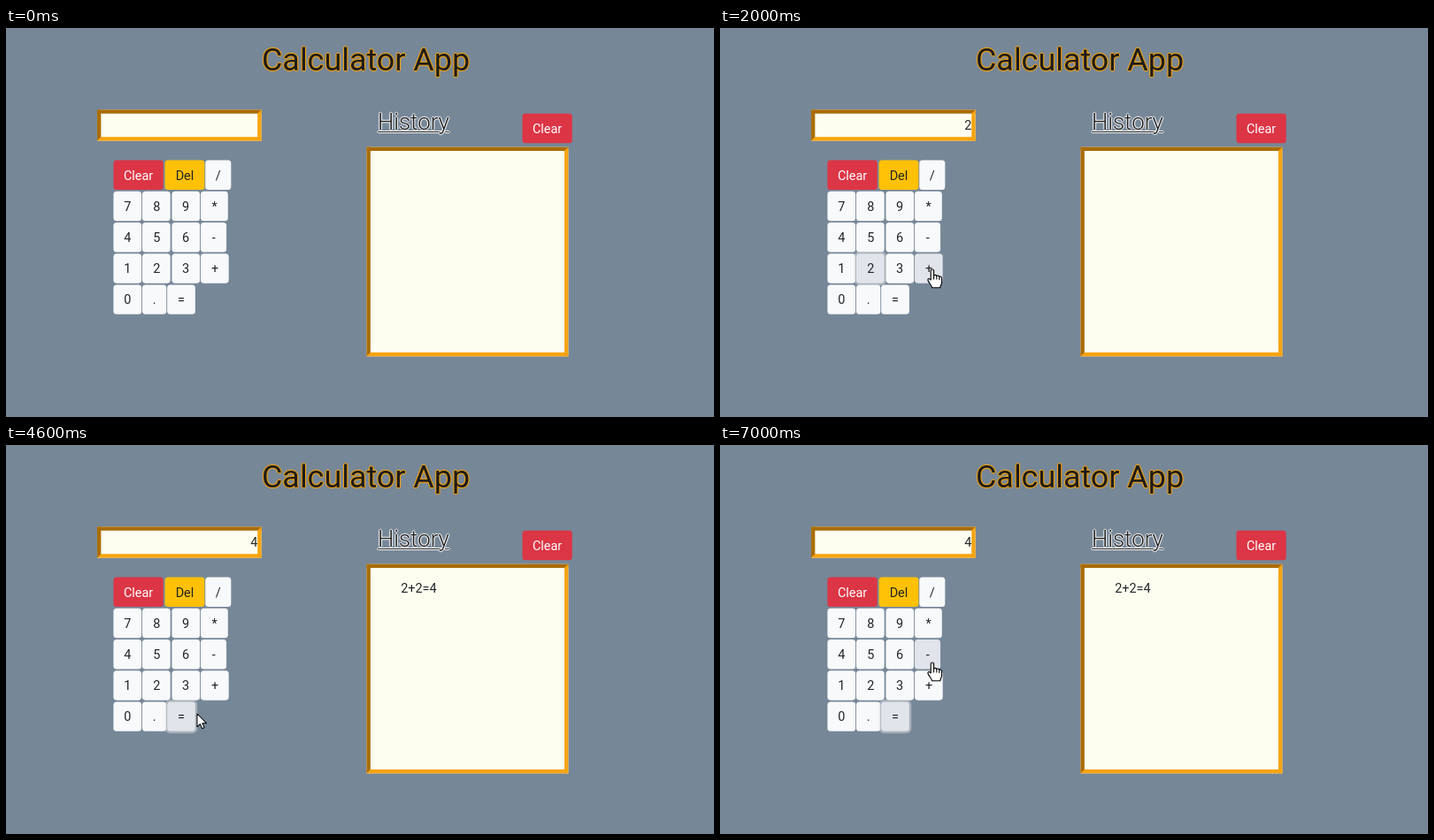
Recreate the animation shown at these times as an HTML page. Size 800 px wide and 440 px high, loop 7.1 s.

```html
<!DOCTYPE html>
<html lang="en">
<head>
<meta charset="utf-8">
<title>Calculator App</title>
<style>
  html, body { margin: 0; width: 100%; height: 100%; overflow: hidden; background: #768798; }
  #stage {
    position: relative; width: 800px; height: 440px; overflow: hidden;
    background: #768798; color: #212529; font: 16.4px Roboto, sans-serif;
  }
  #page { left: 0; top: 0; width: 909px; height: 500px; transform: scale(.88); transform-origin: 0 0; }
  #stage > *, #page > * { position: absolute; box-sizing: border-box; white-space: pre; }
  h1, h2 { margin: 0; color: #1c1c1c; }
  h1 {
    left: 289px; top: 16px; line-height: 40px; font-size: 35.9px; font-weight: 400;
    text-shadow: 1px 0 1px orange, -1px 0 1px orange, 0 1px 1px orange, 0 -1px 1px orange;
  }
  h2 {
    left: 420px; top: 91px; line-height: 30px; font-size: 25.8px; font-weight: 300;
    text-decoration: underline 1px; text-underline-offset: 2px;
    text-shadow: 1px 0 1px #fff, -1px 0 1px #fff, 0 1px 1px #fff, 0 -1px 1px #fff;
  }
  .field {
    background: #fefef0; border: 5px solid;
    border-color: #a96d08 #f6a410 #f6a410 #a96d08;
  }
  #display { left: 117px; top: 105px; width: 211px; height: 40px; line-height: 32px; text-align: right; }
  #log { left: 463px; top: 153px; width: 259px; height: 269px; padding: 16px 0 0 39px; line-height: 22px; }
  .key {
    display: flex; align-items: center; justify-content: center;
    height: 38px; border-radius: 4px; background: #f8f9fa;
  }
  .red { background: #dc3545; color: #fff; }
  .yellow { background: #ffc107; }
  #cursor { left: 0; top: 0; width: 30px; height: 30px; overflow: visible; }
  #cursor path { fill: #fff; stroke: #000; stroke-width: 1.1; stroke-linejoin: round; stroke-linecap: round; }
</style>
</head>
<body>
<div id="stage">
  <h1>Calculator App</h1>
  <h2>History</h2>
  <div id="page">
    <div id="display" class="field"></div>
    <div id="log" class="field"></div>
  </div>
  <svg id="cursor">
    <path id="arrow" transform="scale(.92)" d="M0 0V16L3.7 12.6 6.2 18.2 8.8 17 6.4 11.6H11.3Z"/>
    <g id="hand">
      <path d="M-1.8 1.5C-1.8-.6 1.6-.6 1.6 1.5V7.2C2.2 5.9 4.6 6.2 4.8 7.6
        5.6 6.6 7.6 7 7.8 8.5 8.8 7.6 10.6 8.2 10.6 10V14.5C10.6 17 9 18 8.8 20.8
        H-.4C-.6 18.6-2.6 16.8-4.6 13.4-6.2 10.8-3.6 9.6-1.8 12Z"/>
      <path d="M1.6 7V11M4.8 7.8V11M7.8 8.6V11.4"/>
    </g>
  </svg>
</div>
<script>
const LOOP = 7100, STEP = 100, FADE = 150, ZOOM = .88;
const [page, display, log, cursor, arrow, hand] =
  ['page', 'display', 'log', 'cursor', 'arrow', 'hand'].map(id => document.getElementById(id));

const keys = [];
function addKey(label, x, w, y, cls = '') {
  const el = document.createElement('div');
  el.className = 'key ' + cls;
  el.textContent = label;
  el.style.cssText = `left:${x}px;top:${y}px;width:${w}px`;
  page.append(el);
  keys.push({ label, x, y, w, h: 38, el, plain: !cls });
}
const rowY = i => 170 + 40 * i;
addKey('Clear', 663, 64, 110, 'red');
addKey('Clear', 138, 64, rowY(0), 'red');
addKey('Del', 204, 51, rowY(0), 'yellow');
addKey('/', 256, 33, rowY(0));
['789*', '456-', '123+'].forEach((row, i) => {
  const lastWidth = [35, 33, 36][i];
  [...row].forEach((c, j) =>
    addKey(c, 138 + 37.4 * j, j < 3 ? 36 : lastWidth, rowY(i + 1)));
});
addKey('0', 138, 36, rowY(4));
addKey('.', 175, 31, rowY(4));
addKey('=', 207, 36, rowY(4));

// time, x, y of the pointer tip
const path = [
  [100, 225, 383], [1100, 169, 271], [1600, 169, 271], [1950, 240, 273],
  [2400, 240, 273], [2900, 172, 272], [3250, 172, 272], [3300, 178, 274],
  [4000, 204, 306], [4400, 204, 306], [4600, 216, 304], [5200, 246, 236],
  [5600, 240, 196], [5750, 240, 204], [5900, 243, 254], [6300, 240, 268],
  [6800, 240, 246], [LOOP, 240, 246]
];
// time, pressed key, shown value
const clicks = [[1500, '2', '2'], [2300, '+', '2+'], [3200, '2', '2+2'], [4200, '=', '4']];

function pointer(t) {
  if (t < path[0][0]) return null;
  const i = path.findIndex(p => p[0] > t);
  const [t0, x0, y0] = path[i - 1], [t1, x1, y1] = path[i];
  const u = (t - t0) / (t1 - t0), s = u * u * (3 - 2 * u);
  return { x: x0 + (x1 - x0) * s, y: y0 + (y1 - y0) * s };
}

function inside(p, k) {
  if (!p) return false;
  const x = p.x / ZOOM - k.x, y = p.y / ZOOM - k.y;
  return x >= 0 && x <= k.w && y >= 0 && y <= k.h;
}
const lastClick = t => clicks.filter(c => c[0] <= t).pop();
const focused = (k, t) => lastClick(t)?.[1] === k.label;

// share of the recent past in which a test held: a linear fade
function fade(test, t) {
  const n = 15;
  let sum = 0;
  for (let i = 0; i < n; i++) if (test(t - (i + .5) * FADE / n)) sum++;
  return sum / n;
}

function draw(t) {
  const p = pointer(t);
  for (const k of keys) {
    if (!k.plain) continue;
    const lit = fade(s => focused(k, s) || inside(pointer(s), k), t);
    const ring = fade(s => focused(k, s), t);
    k.el.style.background = `rgb(${248 - 23 * lit},${249 - 21 * lit},${250 - 16 * lit})`;
    k.el.style.boxShadow = ring ? `0 0 0 ${2.8 * ring}px rgba(216,217,219,${.5 * ring})` : 'none';
  }
  const click = lastClick(t);
  display.textContent = click ? click[2] : '';
  log.textContent = click && click[1] === '=' ? '2+2=4' : '';

  cursor.style.display = p ? '' : 'none';
  if (!p) return;
  const over = keys.some(k => inside(p, k));
  hand.style.display = over ? '' : 'none';
  arrow.style.display = over ? 'none' : '';
  cursor.style.transform = `translate(${Math.round(p.x)}px,${Math.round(p.y)}px)`;
}

const start = performance.now();
function tick() {
  const t = (performance.now() - start) % LOOP;
  draw(Math.floor(t / STEP) * STEP);
  requestAnimationFrame(tick);
}
tick();
</script>
</body>
</html>
```
